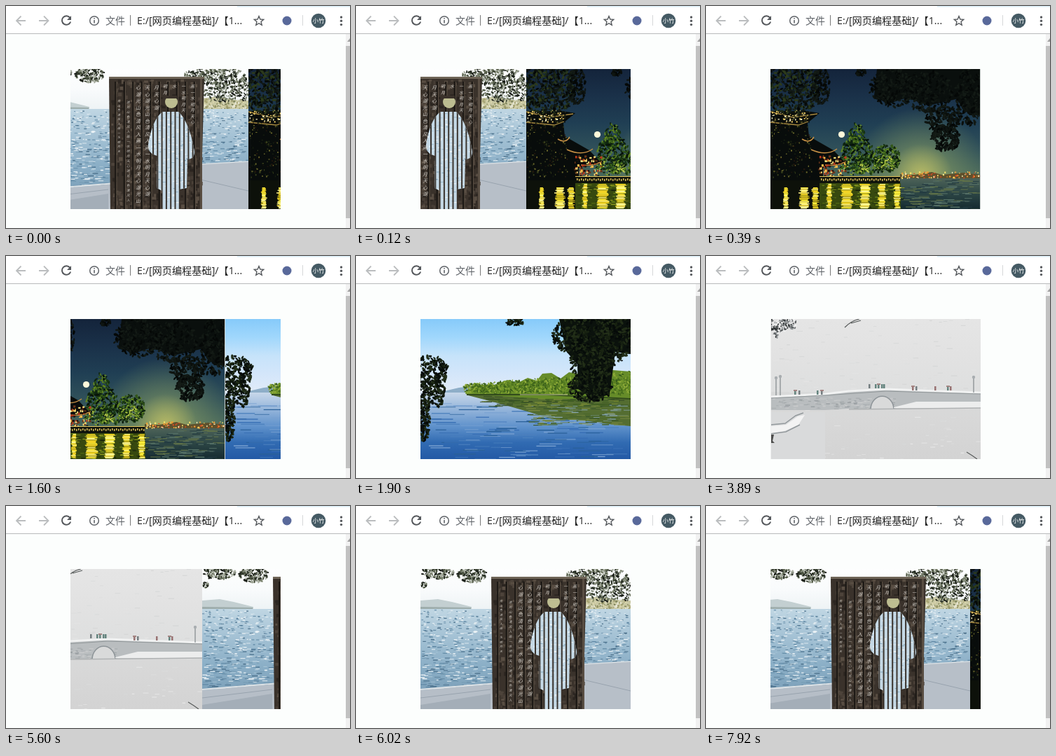
These frames come from a looping animation (491 by 317 pixels, 8000 ms). An HTML page with a canvas:

```html
<!DOCTYPE html>
<html lang="zh-CN">
<head>
<meta charset="utf-8">
<style>
html, body { margin: 0; width: 100%; height: 100%; overflow: hidden; background: #fcfefd; }
svg, canvas { position: absolute; left: 0; top: 0; }
canvas { left: 92px; top: 90px; }
text { font-family: "Open Sans", "Noto Sans CJK SC", "Noto Sans CJK", sans-serif; }
</style>
</head>
<body>
<svg width="491" height="317" fill="none">
  <rect width="491" height="39" fill="#fff"/>
  <path d="M330 .7H491" stroke="#dceef7" stroke-width="1.4"/>
  <path d="M0 39.5H491" stroke="#b9bbbc"/>
  <g stroke="#bbbdbf" stroke-width="1.8">
    <path d="M28 21H15.500M21.500 14.500L15 21L21.500 27.500"/>
    <path d="M47 21H60.500M54 14.500L60.500 21L54 27.500"/>
  </g>
  <path d="M91.500 17A6.300 6.300 0 1 0 92.200 22.500" stroke="#55585c" stroke-width="2"/>
  <path d="M93 14V20H87Z" fill="#55585c"/>
  <circle cx="126" cy="21" r="6.300" stroke="#5f6368" stroke-width="1.500"/>
  <path d="M126 20V24.500M126 17V18.600" stroke="#5f6368" stroke-width="1.600"/>
  <text x="142" y="26" font-size="14" fill="#5f6368">文件</text>
  <path d="M177.500 13V28" stroke="#777"/>
  <text x="187" y="26" font-size="14.200" fill="#222">E:/[网页编程基础]/【1...</text>
  <path d="M361 14.500L362.900 19L367.700 19.400L364 22.500L365.200 27.200L361 24.700L356.800 27.200L358 22.500L354.300 19.400L359.100 19Z" stroke="#55585c" stroke-width="1.400"/>
  <circle cx="401" cy="21" r="6.500" fill="#59699a"/>
  <path d="M423.500 13V28" stroke="#d5d7d9"/>
  <circle cx="446" cy="21" r="10.300" fill="#455a64"/>
  <text x="446" y="24" font-size="8.500" fill="#fff" text-anchor="middle">小竹</text>
  <g fill="#55585c"><circle cx="478.500" cy="16" r="1.700"/><circle cx="478.500" cy="21.300" r="1.700"/><circle cx="478.500" cy="26.600" r="1.700"/></g>
  <rect x="485" y="40" width="6" height="277" fill="#f1f1f1"/>
  <path d="M487 51L491 46V51Z" fill="#a3a3a3"/>
  <rect x="485" y="57" width="6" height="246" fill="#c1c1c1"/>
</svg>
<canvas id="stage" width="300" height="200"></canvas>
<script>
const W = 300, H = 200, TAU = Math.PI * 2;
let seed = 7;
const rnd = () => (seed = seed * 16807 % 2147483647) / 2147483647;
const between = (a, b) => a + (b - a) * rnd();
const pick = list => list[Math.floor(rnd() * list.length)];
let g;

function picture(draw) {
  const c = document.createElement('canvas');
  c.width = W; c.height = H;
  g = c.getContext('2d');
  draw();
  return c;
}
function rect(x, y, w, h, color) {
  g.fillStyle = color;
  g.fillRect(x, y, w, h);
}
// Vertical gradient; stops are spread evenly from y0 to y1.
function fade(y0, y1, ...colors) {
  const grad = g.createLinearGradient(0, y0, 0, y1);
  colors.forEach((c, i) => grad.addColorStop(i / (colors.length - 1), c));
  rect(0, y0, W, y1 - y0, grad);
}
function glow(x, y, r, color) {
  const grad = g.createRadialGradient(x, y, 0, x, y, r);
  grad.addColorStop(0, color);
  grad.addColorStop(1, color.slice(0, 7) + '00');
  rect(x - r, y - r, 2 * r, 2 * r, grad);
}
function shape(path, color) {
  g.fillStyle = color;
  g.fill(new Path2D(path));
}
function line(path, color, width = 1) {
  g.strokeStyle = color; g.lineWidth = width;
  g.stroke(new Path2D(path));
}
function disc(x, y, r, color) {
  g.fillStyle = color;
  g.beginPath(); g.arc(x, y, r, 0, TAU); g.fill();
}
function leaves(cx, cy, rx, ry, n, colors, size = 3) {
  for (let i = 0; i < n; i++) {
    const a = rnd() * TAU, d = Math.sqrt(rnd()), s = between(.6, 1.2) * size;
    g.fillStyle = pick(colors);
    g.beginPath();
    g.ellipse(cx + Math.cos(a) * d * rx, cy + Math.sin(a) * d * ry, s, s * .5, rnd() * TAU, 0, TAU);
    g.fill();
  }
}
function ripples(x0, x1, y0, y1, n, colors, len) {
  for (let i = 0; i < n; i++) {
    const y = between(y0, y1), l = between(.4, 1) * len;
    rect(between(x0, x1 - l), y, l, between(.6, 1.5), pick(colors));
  }
}
function specks(x0, x1, y0, y1, n, colors, size = 2.5) {
  for (let i = 0; i < n; i++)
    rect(between(x0, x1), between(y0, y1), between(.4, 1) * size, between(.4, 1) * size, pick(colors));
}

const stele = picture(() => {
  fade(0, 57, '#fdfefe', '#f9fbfc', '#eef3f5');
  shape('M0 45L25 43L45 47L73 54V57H0Z', '#c3cfd1');
  shape('M0 54L72 55V57H0Z', '#9dacab');
  shape('M235 42L255 39L280 44L300 45V60H235Z', '#c9c8a3');
  specks(235, 300, 42, 58, 160, ['#a7a474', '#dcd7ae', '#858a61', '#e6e5d2'], 3);
  fade(57, 180, '#c0d6e3', '#a3c1d4', '#8aaec6', '#7b9fb8');
  for (let y = 58; y < 172; y += 6) {
    const near = (y - 58) / 114;
    ripples(0, W, y, y + 6, 95 - near * 30, ['#5b84a1', '#7298b1', '#dfeaf0', '#4a6f8a', '#a9c5d6', '#edf3f6'], 4 + near * 6);
  }
  shape('M0 173L110 164V200H0Z', '#b6bec7');
  line('M0 172L110 163', '#dde2e5', 2);
  shape('M0 194L100 178V200H0Z', '#a4aeb8');
  shape('M230 136L300 132V200H230Z', '#b7bfc8');
  line('M230 136L300 132', '#d6dce0', 1.5);
  line('M232 158L300 174M0 184L100 172', '#98a3ae');
  const ink = ['#191d17', '#2c3427', '#4b533f', '#757d68', '#a5ab9d'];
  leaves(24, 5, 24, 9, 130, ink, 2.2);
  leaves(74, 8, 21, 11, 150, ink, 2.2);
  leaves(5, 23, 5, 4, 16, ink, 2);
  leaves(253, 10, 45, 13, 300, ink, 2.2);
  leaves(262, 33, 27, 14, 150, ink, 2.2);
  leaves(293, 27, 8, 18, 60, ink, 2.2);
  shape('M101 12L237 11L232 200H103Z', '#3a322b');
  specks(104, 230, 14, 199, 650, ['#4d433a', '#2b2520', '#594e43', '#463d35'], 6);
  // Grooves and their lit edges
  for (let x = 112; x < 232; x += 12.500) {
    rect(x - 3, 18, 2.5, 182, '#1e1a16');
    rect(x - .5, 18, 1, 182, '#594e43');
  }
  rect(101, 11, 136, 3, '#6f6557');
  rect(231, 14, 3, 186, '#594e43');
  const body = new Path2D('M178 61C166 68 160 90 157 108C156 116 161 122 170 124L169 170L177 174V200H201V172L212 170L213 128C219 130 224 124 223 117C220 98 212 71 200 61Z');
  disc(190, 47, 9, '#bdbd91');
  rect(182, 38, 16, 4, '#3a322b');
  g.save();
  g.clip(body);
  rect(155, 58, 70, 142, '#c4d8e5');
  ripples(155, 225, 62, 200, 220, ['#87a9bf', '#e6eff3', '#a7c2d2', '#f4f7f8'], 5);
  for (let x = 163; x < 222; x += 6.3) rect(x, 58, 2, 142, '#3b352f');
  g.restore();
  g.fillStyle = '#d5d1ca';
  const verse = '湖光山色清风入画一水明月天心';
  const column = (x, top, bottom, size) => {
    g.font = `italic ${size}px "Noto Sans CJK SC", sans-serif`;
    for (let y = top, i = Math.floor(x); y < bottom; y += size + 2.5, i++)
      g.fillText(verse[i % verse.length], x, y);
  };
  column(113, 47, 124, 4);
  column(126, 49, 192, 4.5);
  column(139, 29, 196, 7);
  column(152, 29, 187, 7);
  column(165, 29, 67, 7);
  [[178, 38], [191, 31], [204, 64], [217, 86]].forEach(([x, end]) => column(x, 27, end, 6));
});

const night = picture(() => {
  fade(0, 156, '#14243b', '#1a3149', '#203f54', '#31525a', '#4a6a5c');
  glow(215, 150, 95, '#8fa465d0');
  glow(215, 152, 45, '#c5c266c0');
  fade(156, 200, '#4c6258', '#2c4544', '#152a30');
  ripples(180, W, 158, 200, 130, ['#557066', '#213940', '#5f7149'], 18);
  shape('M185 154V150L205 151L230 147L245 151L275 148L300 151V156H185Z', '#5f512d');
  specks(185, 299, 146, 155, 90, ['#ffe36b', '#f49b35', '#fff3ba', '#d94d26']);
  disc(101.500, 93.500, 4.600, '#fff8da');
  // Lit trees
  const shade = ['#07130a', '#0f2410', '#1b3a14', '#34591a', '#5f8423'];
  const lit = ['#10240f', '#3d661b', '#7e9f31', '#b9c94a'];
  leaves(123, 97, 11, 20, 130, shade, 2.2);
  leaves(124, 121, 23, 26, 330, shade, 2.4);
  leaves(166, 127, 19, 19, 230, shade, 2.4);
  leaves(143, 136, 20, 14, 110, shade, 2.2);
  leaves(121, 141, 22, 10, 100, lit, 2);
  leaves(165, 135, 18, 13, 100, lit, 2);
  // Pavilion
  shape('M0 60H52L70 63L53 77L55 96L90 116L108 135L75 141V200H0Z', '#080c0b');
  line('M0 61L32 69L67 64M0 76L40 80L54 75', '#aa8b41', 1.3);
  specks(0, 55, 58, 75, 130, ['#f2cf65', '#3b3a1c', '#1e2413', '#fff6c4', '#080c0b']);
  specks(0, 58, 75, 154, 190, ['#3a421c', '#171f10', '#6d6a2c', '#0b100c', '#24170d']);
  line('M45 100Q56 107 62 97M58 115Q80 125 95 114M78 137Q95 139 108 132', '#c58f45', 1.5);
  specks(68, 106, 123, 154, 100, ['#b93a1d', '#f4bb4a', '#6b3419', '#ffe680', '#1a120b'], 3.5);
  // Pier and golden reflections
  rect(0, 159, 185, 41, '#0d110a');
  rect(70, 163, 116, 37, '#37490f');
  ripples(72, 192, 163, 200, 170, ['#6b8419', '#26350e', '#131c0c', '#8f9a1d'], 8);
  rect(70, 154, 115, 9, '#10140c');
  for (let x = 72; x < 185; x += 3) rect(x, 156 + x % 2, 1.5, 3, '#d8ba58');
  line('M70 153.500H185', '#e0c25c');
  [[22, 7], [48, 14], [64, 9], [84, 7], [109, 17], [135, 14], [159, 11], [181, 9]].forEach(([x, w]) => {
    for (let y = x < 70 ? 169 : 164; y < 198; y += 1.2) {
      const l = w * between(.6, 1.1);
      rect(x - l / 2 + between(-1, 1), y, l, 1.5, pick(['#ffee3a', '#f2d425', '#fff68c', '#b9a81c']));
    }
  });
  // Overhanging foliage
  const black = ['#050807', '#0a0f0d', '#0f1511', '#131a15'];
  leaves(30, 27, 44, 36, 520, [...black, '#1c2a16', '#2c3a1b'], 2.8);
  leaves(72, 24, 13, 27, 130, black, 2.8);
  shape('M152 0H300V66L284 66L265 43L226 52L194 41L167 50L148 38Z', '#0a0f0d');
  leaves(175, 27, 34, 27, 260, black);
  leaves(224, 32, 35, 30, 260, black);
  leaves(283, 40, 20, 42, 230, black);
  leaves(246, 72, 24, 20, 190, black);
  leaves(250, 100, 21, 17, 170, black);
  leaves(129, 4, 8, 5, 30, black);
  rect(299, 0, 1, 200, '#c9cfcd');
});

const lake = picture(() => {
  fade(0, 105, '#86cafa', '#a0d7fc', '#c6e3fa', '#d4e6fa', '#e1ebf8');
  fade(105, 200, '#c8d8ea', '#95b5da', '#6193cc', '#316bb2', '#2359a5');
  shape('M25 105L55 98L73 96L90 105Z', '#8eaec8');
  ripples(0, W, 120, 200, 150, ['#79a1d1', '#4c80bd', '#296099', '#376eb4'], 34);
  shape('M68 109H300V153L260 149L229 144L188 143L156 133L118 122Z', '#546d31');
  ripples(85, W, 110, 125, 130, ['#3e5d22', '#788a34', '#354c26'], 18);
  ripples(150, W, 122, 151, 150, ['#4b672c', '#768640', '#38552a', '#86a4ae'], 17);
  shape('M64 107L68 100L86 94L105 94L124 87L139 91L153 84L166 88L174 78L187 77L200 85L212 76L250 82L275 73L300 75V114H180Z', '#668c29');
  const trees = ['#466d1d', '#587d22', '#75992b', '#92ad3b', '#375b1b'];
  for (let x = 70; x < 302; x += 12) leaves(x, 102 - x * .035, 9, 4 + x * .045, 60, trees, 2);
  line('M66 108H180L300 114', '#324b1c', 2);
  line('M142 108H210', '#c4c79b');
  const black = ['#060b09', '#0c130d', '#172111', '#222e18'];
  shape('M198 0H300V50L278 47L270 108L246 114L225 100L224 65L208 46Z', '#0b120d');
  leaves(232, 24, 44, 28, 360, black);
  leaves(277, 27, 26, 36, 300, black);
  leaves(245, 62, 31, 30, 300, black);
  leaves(242, 97, 30, 22, 260, black);
  leaves(134, 4, 13, 6, 60, black, 2.5);
  leaves(14, 75, 25, 23, 190, black);
  leaves(13, 107, 23, 22, 160, black);
  leaves(5, 144, 8, 30, 110, black);
});

const snow = picture(() => {
  fade(0, 104, '#e5e5e5', '#e2e2e2', '#dedfdf');
  fade(104, 200, '#d9dada', '#d7d7d7', '#d3d3d3');
  ripples(0, W, 0, 200, 180, ['#e4e4e4', '#dcdddd', '#d7d8d8'], 9);
  shape('M0 112L78 107L112 103L165 100L215 102L300 105V126L210 120L176 128H112L78 130H0Z', '#b9bdbf');
  ripples(0, 180, 112, 128, 150, ['#a8adaf', '#c8cacb', '#979da0'], 7);
  line('M0 111L78 107L112 103L165 100L215 102L300 105', '#f1f2f2', 3);
  line('M0 113L78 109L165 103L300 107', '#92989a');
  shape('M143 129A14 16 0 0 1 176 129Z', '#d9dada');
  line('M143 129A14 16 0 0 1 176 129', '#8d9498', 1.5);
  shape('M176 126L208 118L300 118V127H176Z', '#eceded');
  line('M112 129L300 127', '#afb2b3', 1.5);
  shape('M0 133H78V200H0Z', '#d9dadb');
  shape('M0 153L22 151L39 139L49 137L40 151L20 160L0 163Z', '#f3f3f3');
  line('M0 151L21 149L36 138L47 134M0 164L22 161L42 151', '#93999c', 1.5);
  shape('M0 165H5L3 174L6 177H0Z', '#4d4d4c');
  line('M8 109V85M14 109V83M290 105V83', '#898f92', 1.3);
  [[8, 84], [14, 82], [290, 83]].forEach(([x, y]) => disc(x, y, 2.2, '#a8adb0'));
  [34, 40, 66, 72, 140, 149, 153, 158, 161, 202, 207, 234, 252, 256].forEach((x, i) => {
    const y = x < 80 ? 102 : x < 180 ? 93 : 96;
    rect(x, y, 2.5, 6, pick(['#747d80', '#987373', '#64847e']));
    if (i % 3 === 0) rect(x - 1, y - 1, 5, 2, '#a48583');
  });
  const branch = ['#595d5f', '#929698', '#f1f1f1', '#333738'];
  leaves(10, 10, 12, 16, 90, branch, 2.2);
  leaves(28, 7, 9, 8, 40, branch, 2.2);
  line('M106 12Q116 2 127 0M115 6L129 2M280 190Q287 194 295 200', '#555958', 1.2);
  rect(0, 0, 1, 200, '#f0f0f0');
});

const slides = [stele, night, lake, snow];
// [time in ms, scroll position of the strip in px]
const steps = [
  [0, 46], [120, 149], [270, 270], [390, 300],
  [1600, 379], [1750, 515], [1900, 600],
  [3590, 678.500], [3740, 815], [3890, 900],
  [5600, 1012], [5720, 1100], [5870, 1195], [6020, 1200], [7920, 1215]
];
const ctx = document.getElementById('stage').getContext('2d');

function frame() {
  const t = performance.now() % 8000;
  const pos = steps.filter(([at]) => at <= t).pop()[1];
  const index = Math.floor(pos / W), x = Math.round(-(pos % W));
  ctx.drawImage(slides[index % 4], x, 0);
  ctx.drawImage(slides[(index + 1) % 4], x + W, 0);
  requestAnimationFrame(frame);
}
frame();
</script>
</body>
</html>
```
